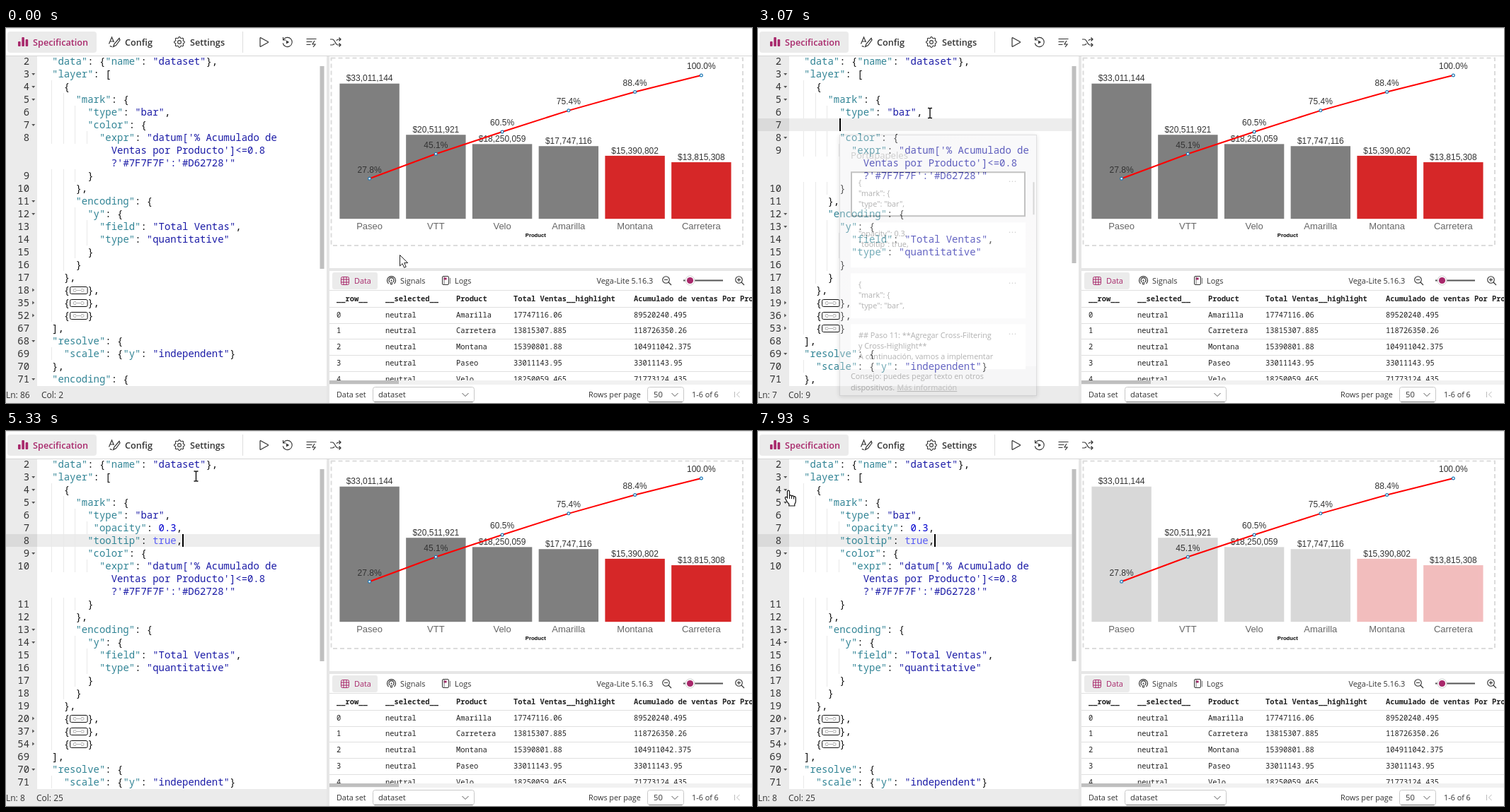
An HTML page that plays this animation: 1054 px wide and 531 px high, repeating every 8 s.

```html
<!DOCTYPE html>
<html lang="es">
<head>
<meta charset="utf-8">
<title>Pareto editor</title>
<style>
  html, body { margin: 0; width: 100%; height: 100%; overflow: hidden; background: #fff; }
  svg { display: block; width: 100vw; height: 100vh; }
  text { white-space: pre; }
  .ui { font-family: "Open Sans", "Noto Sans", sans-serif; }
  .code { font-family: "Noto Sans Mono", "DejaVu Sans Mono", monospace; }
  .plot { font-family: "Liberation Sans", Arial, sans-serif; text-anchor: middle; }
</style>
</head>
<body>
<svg id="stage" viewBox="0 0 1054 531"></svg>
<script>
const svg = document.getElementById('stage');
const PINK = '#a8286b', INK = '#333', FPS = 15, LOOP = 8000;

function el(parent, tag, attrs = {}, text) {
  const n = document.createElementNS('http://www.w3.org/2000/svg', tag);
  for (const k in attrs) n.setAttribute(k, attrs[k]);
  if (text !== undefined) n.textContent = text;
  parent.appendChild(n);
  return n;
}
const group = (p, attrs) => el(p, 'g', attrs);
const rect = (p, x, y, width, height, fill, more) => el(p, 'rect', { x, y, width, height, fill, ...more });
const line = (p, d, stroke = INK, more) => el(p, 'path', { d, stroke, fill: 'none', 'stroke-width': 1, ...more });
const dot = (p, cx, cy, r, more) => el(p, 'circle', { cx, cy, r, fill: 'none', stroke: INK, ...more });
const label = (p, x, y, s, size, fill = INK, more) =>
  el(p, 'text', { class: 'ui', x, y, 'font-size': size, fill, ...more }, s);
const show = (n, on) => n.setAttribute('visibility', on ? 'visible' : 'hidden');

function clip(id, x, y, w, h) {
  rect(el(svg, 'clipPath', { id }), x, y, w, h, '#000');
  return group(svg, { 'clip-path': `url(#${id})` });
}

/* ---------- code editor ---------- */
const SIZE = 13.94, CH = SIZE * .6, LEFT = 48.3, ROW = 18, TOP = 38;
const editor = clip('ed', 0, 40, 451, 467);
rect(editor, 0, 40, 44, 467, '#ebebeb');
const activeGutter = rect(editor, 0, 0, 44, ROW, '#dadada');
const activeLine = rect(editor, 44, 0, 399.5, ROW, '#ededed');

// [text, fold mark, lines covered]
const head = [
  ['  "data": {"name": "dataset"},'], ['  "layer": [', 'v'], ['    {', 'v'],
  ['      "mark": {', 'v'], ['        "type": "bar",']
];
const tail = [
  ['        "color": {', 'v'],
  ['          "expr": "datum[\'% Acumulado de'],
  ['            Ventas por Producto\']<=0.8', '', 0],
  ['            ?\'#7F7F7F\':\'#D62728\'"', '', 0],
  ['        }'], ['      },'], ['      "encoding": {', 'v'], ['        "y": {', 'v'],
  ['          "field": "Total Ventas",'], ['          "type": "quantitative"'],
  ['        }'], ['      }'], ['    },'],
  ['    {@},', '>', 17], ['    {@},', '>', 17], ['    {@}', '>', 15],
  ['  ],'], ['  "resolve": {', 'v'], ['    "scale": {"y": "independent"}'],
  ['  },'], ['  "encoding": {', 'v']
];
const TOKENS = /"[^"]*"(?=:)|"[^"]*"?|true|\d[\d.]*|[^"\dt]+|./g;

function tokenColor(s, rest) {
  if (s[0] === '"') return rest[0] === ':' ? '#318495' : '#1a1aa6';
  if (s === 'true') return '#585cf6';
  return /^\d/.test(s) ? '#0000cd' : '#111';
}

function codeLine(p, src, y, wrapped) {
  const body = src.trimStart(), col = src.length - body.length;
  const at = (c, s) => el(p, 'text', { class: 'code', x: LEFT + c * CH, y, 'font-size': SIZE, fill: '#111' }, s);
  if (wrapped) {
    at(col, body).setAttribute('fill', '#1a1aa6');
    return;
  }
  // indent guides
  for (let c = 2; c < col; c += 2) rect(p, Math.round(LEFT + c * CH) - 1, y - 14, 1, ROW, '#e9e9e9');
  if (body.includes('@')) {
    const x = LEFT + (col + 1) * CH;
    at(col, '{');
    rect(p, x + .5, y - 9.5, 24.5, 10, '#fff', { stroke: '#111', rx: 2 });
    line(p, `M${x + 9} ${y - 6.5}h-2a2 2 0 0 0 0 4h2m7 -4h2a2 2 0 0 1 0 4h-2m-8 -2h9`, '#aaa');
    at(col + 4, body.slice(2));
    return;
  }
  const t = at(col, '');
  for (const m of body.matchAll(TOKENS))
    el(t, 'tspan', { fill: tokenColor(m[0], body.slice(m.index + m[0].length)) }, m[0]);
}

function page(extra) {
  const g = group(editor);
  let num = 2;
  [...head, ...extra, ...tail].forEach(([src, fold, span = 1], i) => {
    const y = TOP + ROW * i + 14;
    codeLine(g, src, y, span === 0);
    if (!span) return;
    el(g, 'text', { class: 'code', x: 33, y, 'font-size': SIZE, fill: INK, 'text-anchor': 'end' }, num);
    if (fold) el(g, 'path', {
      d: fold === 'v' ? `M36.2 ${y - 6}h5l-2.5 3z` : `M37.2 ${y - 7.5}v5l3 -2.5z`, fill: '#555'
    });
    num += span;
  });
  return g;
}
const pages = [
  page([]),
  page([['']]),
  page([['         "opacity": 0.3,'], ['        "tooltip": true,']])
];
const caret = rect(editor, 0, 0, 2, ROW, '#000');
const thumb = rect(editor, 443.5, 54, 6, 287, '#bfbfbf');

rect(svg, 0, 507, 453, 24, '#ebebeb');
const lnText = label(svg, 0, 523.5, '', 12);
const colText = label(svg, 0, 523.5, '', 12);

/* ---------- toolbar ---------- */
rect(svg, 0, 0, 1054, 1, '#e3e3e3');
rect(svg, 0, 39, 1054, 1, '#d6d6d6');
rect(svg, 2, 5, 126, 30, '#ebebeb', { rx: 4 });
[[17, 19], [22.3, 13], [27.6, 16]].forEach(([x, y]) => rect(svg, x, y, 3.6, 26 - y, PINK, { rx: 1 }));
const bold = { 'font-weight': 600 };
label(svg, 38, 24.5, 'Specification', 12.7, PINK, bold);
label(svg, 168, 24.5, 'Config', 12.7, INK, bold);
label(svg, 260, 24.5, 'Settings', 12.7, INK, bold);
line(svg, 'M145.5 22.5l4 -9.5 3 7M147 19h4.5M160 14.5l-7 8 -1.5 4 4 -2 5.5 -7.5zM150 26q-2 1 -3 -1', INK, { 'stroke-width': 1.2 });
let gear = '';
for (let i = 0; i <= 64; i++) {
  const a = i / 64 * Math.PI * 2, r = 6.6 + .9 * Math.cos(8 * a);
  gear += `${i ? 'L' : 'M'}${(245 + r * Math.cos(a)).toFixed(2)} ${(20 + r * Math.sin(a)).toFixed(2)}`;
}
line(svg, gear, INK, { 'stroke-width': 1.1 });
dot(svg, 245, 20, 2.4, { 'stroke-width': 1.1 });
rect(svg, 334, 5, 1, 30, '#ddd');
const playBox = rect(svg, 348, 5, 31, 30, '#f3f3f3', { rx: 4 });
const play = line(svg, 'M359 14.2v11.6q0 .8 .8 .4l10.4 -5.7q.7 -.5 0 -1l-10.4 -5.7q-.8 -.4 -.8 .4z', INK, { 'stroke-width': 1.2 });
line(svg, 'M392 16.5a6.6 6.6 0 1 1 -.8 5M391.5 13v4h4', INK, { 'stroke-width': 1.1 });
el(svg, 'path', { d: 'M396 17.5v5l4.2 -2.500z', fill: INK });
line(svg, 'M424.5 15.5h14M424.5 19.5h8M424.5 23.5h6M436 18l-3 5h4l-3 4', INK, { 'stroke-width': 1.2 });
line(svg, 'M458 16h3q2 0 4 4t4 4h4M458 24h3q2 0 3 -2M467 18q1 -2 3 -2h3M470.5 13.5l2.5 2.5 -2.5 2.5M470.5 21.5l2.5 2.5 -2.5 2.5', INK, { 'stroke-width': 1.2 });

/* ---------- chart ---------- */
rect(svg, 453, 40, 4, 491, '#e6e6e6');
rect(svg, 457, 340, 597, 4, '#e6e6e6');
rect(svg, 459.5, 42.5, 581.5, 265.5, 'none', { stroke: '#dcdcdc', 'stroke-width': 2, 'stroke-dasharray': '6 4' });
const sales = [
  ['Paseo', 33011144, 27.8], ['VTT', 20511921, 45.1], ['Velo', 18250059, 60.5],
  ['Amarilla', 17747116, 75.4], ['Montana', 15390802, 88.4], ['Carretera', 13815308, 100]
];
const BASE = 270.2;
const midX = i => 513.6 + 93.75 * i, pctY = p => 67 + (100 - p) * 2.026;
const plotText = (x, y, s, size, fill, more) =>
  el(svg, 'text', { class: 'plot', x, y, 'font-size': size, fill, ...more }, s);
const bars = group(svg);
sales.forEach(([name, v, p], i) => {
  const h = v / 33011144 * 191.5;
  rect(bars, midX(i) - 42.2, BASE - h, 84.4, h, p <= 80 ? '#7f7f7f' : '#d62728');
  plotText(midX(i), BASE - 3.3 - h, '$' + v.toLocaleString('en-US'), 12, INK);
  plotText(midX(i), 284.5, name, 13, '#666');
});
plotText(748.3, 295.5, 'Product', 7.7, '#000', { 'font-weight': 700 });
line(svg, 'M' + sales.map((s, i) => midX(i) + ' ' + pctY(s[2])).join('L'), '#f00', { 'stroke-width': 2 });
sales.forEach(([, , p], i) => {
  dot(svg, midX(i), pctY(p), 1.9, { fill: '#fff', stroke: '#1f77b4', 'stroke-width': 1.2 });
  plotText(midX(i), pctY(p) - 8.6, p.toFixed(1) + '%', 12, INK);
});

/* ---------- data panel ---------- */
rect(svg, 461, 346, 64, 24, '#ebebeb', { rx: 3 });
rect(svg, 473.5, 352.5, 11, 11, 'none', { stroke: PINK, rx: 2 });
line(svg, 'M477 352v12M481 352v12M473 356h12M473 360h12', PINK);
label(svg, 492, 362, 'Data', 10.9, PINK);
line(svg, 'M540.5 362a6 6 0 1 1 8 0M542.5 360a3.5 3.5 0 1 1 4 0', INK, { 'stroke-width': 1.2 });
dot(svg, 544.5, 357.5, 1, { fill: INK, stroke: 'none' });
line(svg, 'M543.5 363v-2.500q1 -1 2 0v2.500z', INK);
label(svg, 557, 362, 'Signals', 10.9);
rect(svg, 616.5, 351.5, 9, 12, 'none', { stroke: INK, rx: 1.5 });
rect(svg, 618.5, 353.5, 4, 3, PINK);
line(svg, 'M627.5 354v8M619 351.5v12', '#777');
label(svg, 634, 362, 'Logs', 10.9);
label(svg, 834.5, 362, 'Vega-Lite 5.16.3', 10.9);
for (const [x, sign] of [[932.5, 'M930 356.5h5'], [1035.5, 'M1033 356.5h5M1035.5 354v5']]) {
  dot(svg, x, 356.5, 4.8, { 'stroke-width': 1.1 });
  line(svg, `M${x + 3.5} 360l4 4${sign}`, INK, { 'stroke-width': 1.1 });
}
line(svg, 'M957 357.5h56', '#555', { 'stroke-width': 2 });
dot(svg, 966.5, 357.5, 6.5, { fill: '#fff', stroke: '#d1d1d1' });
dot(svg, 966.5, 357.5, 4.6, { fill: PINK, stroke: 'none' });

const table = clip('tb', 457, 371, 597, 128);
const cols = [467, 536, 636, 717, 887];
const rows = [
  ['__row__', '__selected__', 'Product', 'Total Ventas__highlight', 'Acumulado de ventas Por Producto'],
  ['0', 'neutral', 'Amarilla', '17747116.06', '89520240.495'],
  ['1', 'neutral', 'Carretera', '13815307.885', '118726350.26'],
  ['2', 'neutral', 'Montana', '15390801.88', '104911042.375'],
  ['3', 'neutral', 'Paseo', '33011143.95', '33011143.95'],
  ['4', 'neutral', 'Velo', '18250059.465', '71773124.435']
];
rect(table, 457, 371, 597, 1, '#e0e0e0');
rows.forEach((cells, r) => {
  const y = 387 + 22.7 * r;
  cells.forEach((s, c) => el(table, 'text', {
    class: 'code', x: cols[c], y, 'font-size': 10.43, fill: '#222', 'font-weight': r ? 400 : 700
  }, s));
  rect(table, 457, Math.round(y + 8), 597, 1, '#e0e0e0');
});
rect(svg, 457, 499, 597, 6, '#f1f1f1');
rect(svg, 457, 499, 98, 5, '#bfbfbf');
label(svg, 467, 523, 'Data set', 10.8);
label(svg, 823, 523, 'Rows per page', 10.8);
label(svg, 969, 523, '1-6 of 6', 10.8);
for (const [x, w, s, tx] of [[518.5, 143, 'dataset', 526], [906.5, 51, '50', 915]]) {
  rect(svg, x, 508.5, w, 21, '#fff', { stroke: '#c8c8c8', rx: 3 });
  line(svg, `M${x + 2} 529.5h${w - 4}`, '#777');
  label(svg, tx, 523, s, 11.2);
  line(svg, `M${x + w - 17} 517l4.5 4.5 4.5 -4.5`, '#555');
}
line(svg, 'M1029.5 515v8M1036.5 515l-4 4 4 4', '#bbb');

/* ---------- clipboard popup ---------- */
const grad = el(svg, 'linearGradient', { id: 'glass', x2: 1, y2: 1 });
el(grad, 'stop', { offset: 0, 'stop-color': '#eaeaed' });
el(grad, 'stop', { offset: 1, 'stop-color': '#f3f2f4' });
const popup = group(svg, { style: 'filter:drop-shadow(0 1px 3px rgba(0,0,0,.4))' });
rect(popup, 115.5, 151.5, 278, 369, 'url(#glass)', { stroke: '#a0a0a4' });
rect(popup, 116, 479, 277, 41, '#e5e5e7');
const list = group(popup);
label(list, 131, 175, 'Portapapeles', 13.15, '#666');
const clips = [
  ['{', '"mark": {', '"type": "bar",'],
  ['"opacity": 0.3,', '"tooltip": true,'],
  ['{', '"mark": {', '"type": "bar",'],
  ['## Paso 11: **Agregar Cross-Filtering', 'y Cross-Highlight**', 'A continuación, vamos a implementar']
];
const frames = clips.map((texts, i) => {
  const y = 193 + 72 * i;
  rect(list, 131, y, 247, 64, '#fff');
  texts.forEach((s, k) => label(list, 142, y + 19.3 + 15.3 * k, s, 10.8, '#111'));
  for (let k = 0; k < 3; k++) dot(list, 355.5 + 4 * k, y + 14, .8, { fill: '#666', stroke: 'none' });
  return rect(list, 132, y + 1, 245, 62, 'none', { stroke: '#444', 'stroke-width': 2 });
});
rect(list, 388.5, 208, 2, 46, '#858585');
label(popup, 131, 497, 'Consejo: puedes pegar texto en otros', 10.8, '#111');
label(popup, 131, 513, 'dispositivos. ', 10.8, '#111');
label(popup, 196.5, 513, 'Más información', 10.8, '#555', { 'text-decoration': 'underline' });

/* ---------- pointer ---------- */
const pointer = group(svg);
const shapes = { arrow: group(pointer), beam: group(pointer), hand: group(pointer) };
line(shapes.arrow, 'M.5 -.5v15.5l3.6 -3.4 2.5 5.7 2.6 -1.1 -2.5 -5.6h5z', '#222', { fill: '#fff' });
const beam = 'M-3 -7h2q1 0 1 1v12q0 1 -1 1h-2M3 -7h-2q-1 0 -1 1M3 7h-2q-1 0 -1 -1';
line(shapes.beam, beam, '#fff', { 'stroke-width': 3, opacity: .7 });
line(shapes.beam, beam, '#111', { 'stroke-width': 1.4 });
line(shapes.hand, 'M-1.5 1q0 -1.8 1.5 -1.8t1.5 1.8v6q.3 -1.2 1.5 -1.2t1.5 1.6q.4 -.9 1.5 -.8t1.5 1.6q.4 -.7 1.4 -.5t1.4 1.8v5q0 2 -1.5 4v2.5h-8v-2.5q-3 -3 -5 -7.5 -1 -2 .3 -2.5t2.4 1.2v-8.7z', '#111', { fill: '#fff', 'stroke-width': 1.2 });
line(shapes.hand, 'M1.5 7v4M4.5 8v3M7.5 9v2.5', '#111');

// [step, x, y]
const path = [
  [0, 556, 322], [1, 562, 327], [3, 602, 344], [4, 614, 344], [5, 604, 325], [7, 520, 240],
  [9, 400, 180], [11, 290, 135], [12, 255, 123], [13, 243, 120.5], [56, 243, 120.5],
  [60, 246, 190], [64, 241, 264], [66, 243, 284], [70, 243, 284], [74, 247, 230],
  [78, 266, 105], [80, 268.5, 64], [81, 266, 46], [82, 262, 30], [84, 310, 20],
  [86, 365, 20], [101, 365, 20], [103, 356, 44], [106, 300, 115], [109, 200, 150],
  [112, 110, 118], [114, 75, 95], [116, 60, 92], [119, 43, 85]
];

function locate(f) {
  const i = path.findIndex(k => k[0] > f);
  if (i < 0) return path[path.length - 1].slice(1);
  const [a, x0, y0] = path[i - 1], [b, x1, y1] = path[i], u = (f - a) / (b - a);
  return [x0 + (x1 - x0) * u, y0 + (y1 - y0) * u];
}

function pointerKind(x, y, f, onPlay) {
  if (onPlay) return 'hand';
  if (x > 450 || y < 40 || (f >= 52 && f < 73)) return 'arrow';
  return x > 45 ? 'beam' : 'hand';
}

// [from step, page, line, column, caret row, thumb bottom]
const edits = [
  [0, 0, 86, 2, -9, 341], [14, 0, 6, 23, 4, 341],
  [29, 1, 7, 9, 5, 333], [69, 2, 8, 25, 6, 326]
];

function render(ms) {
  const f = Math.floor(ms / 1000 * FPS + .1);
  const [, pg, ln, col, row, end] = edits.filter(e => e[0] <= f).pop();
  const y = TOP + ROW * row;
  pages.forEach((p, i) => show(p, i === pg));
  activeGutter.setAttribute('y', y);
  activeLine.setAttribute('y', y);
  caret.setAttribute('y', y);
  caret.setAttribute('x', Math.round(LEFT + (col - 1) * CH));
  show(caret, !(f >= 24 && f < 29) && !(f >= 42 && f < 46));
  thumb.setAttribute('height', end - 54);
  lnText.textContent = 'Ln: ' + ln;
  colText.textContent = 'Col: ' + col;
  colText.setAttribute('x', ln > 9 ? 50 : 43);

  const opening = Math.min(1, Math.max(0, (f - 45) / 5));
  const closing = Math.min(1, Math.max(0, (f - 69) / 3));
  popup.setAttribute('opacity', Math.min(1, opening * 1.6) * (1 - closing));
  show(popup, f >= 46 && f < 72);
  list.setAttribute('transform', `translate(0 ${16 * (1 - opening) ** 2})`);
  frames.forEach((r, i) => r.setAttribute('opacity', i === (f >= 65 ? 1 : 0) ? 1 : 0));

  bars.setAttribute('opacity', f >= 96 ? .3 : 1);
  const [px, py] = locate(f);
  const onPlay = px > 348 && px < 379 && py < 36;
  playBox.setAttribute('opacity', onPlay ? 1 : 0);
  play.setAttribute('stroke', onPlay ? PINK : INK);
  const kind = pointerKind(px, py, f, onPlay);
  for (const k in shapes) shapes[k].setAttribute('display', k === kind ? 'inline' : 'none');
  pointer.setAttribute('transform', `translate(${px} ${py})`);
}

const start = performance.now();
function tick() {
  render((performance.now() - start) % LOOP);
  requestAnimationFrame(tick);
}
render(0);
requestAnimationFrame(tick);
</script>
</body>
</html>
```
